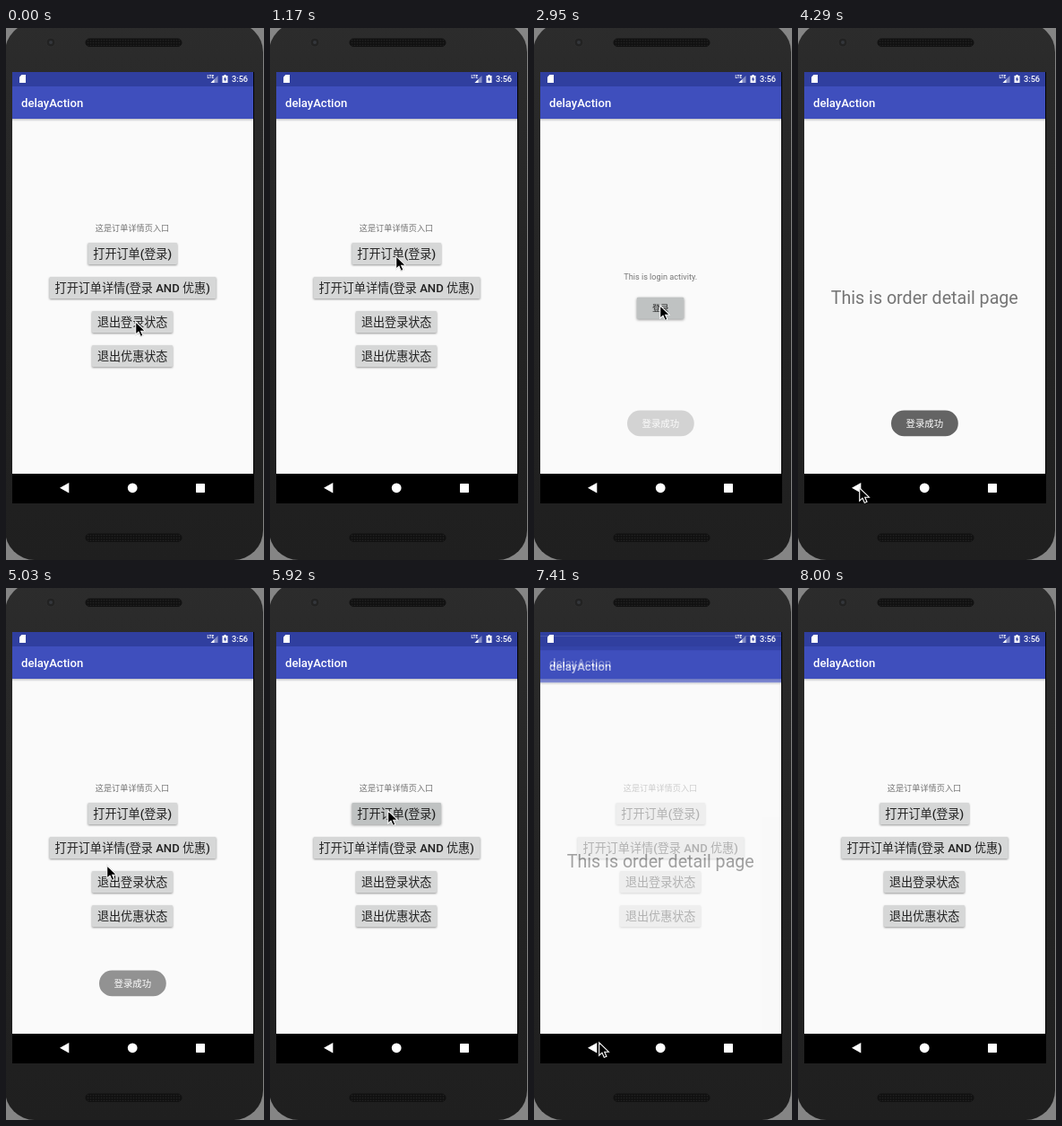
An HTML page that plays this animation: 288 px wide and 592 px high, repeating every 8.15 s.

```html
<!DOCTYPE html>
<html lang="zh">
<head>
<meta charset="utf-8">
<title>delayAction</title>
<style>
  html, body { margin: 0; width: 100%; height: 100%; overflow: hidden; background: #858585; }
  svg { display: block; width: 100%; height: 100%; }
  text { font-family: Roboto, "Noto Sans CJK SC", "Noto Sans CJK", sans-serif; }
  .mid { text-anchor: middle; }
  .small { font-size: 9.17px; fill: #757575; }
  .label { font-size: 13.1px; font-weight: 500; fill: #212121; }
  .button rect { fill: #d6d7d7; filter: drop-shadow(0 1px .8px #0006); }
  .button.pressed rect { fill: #bfc2c2; filter: drop-shadow(0 1.5px 1.5px #0006); }
</style>
</head>
<body>
<svg viewBox="0 0 288 592">
  <defs>
    <linearGradient id="body" x2="0" y2="1">
      <stop offset="0" stop-color="#2c2c2c"/>
      <stop offset=".5" stop-color="#242424"/>
      <stop offset="1" stop-color="#1f1f1f"/>
    </linearGradient>
    <linearGradient id="shade" x2="0" y2="1">
      <stop offset="0" stop-opacity=".22"/>
      <stop offset="1" stop-opacity="0"/>
    </linearGradient>
    <pattern id="mesh" width="3" height="3" patternUnits="userSpaceOnUse">
      <rect width="3" height="3" fill="#111"/>
      <circle cx="1.5" cy="1.5" r=".8" fill="#222"/>
    </pattern>
    <clipPath id="glass"><path d="M7 49H277V529H7Z"/></clipPath>
    <g id="window">
      <path d="M7 49H276V529H7Z" fill="#fafafa"/>
      <path d="M7 101H276V104H7Z" fill="url(#shade)"/>
      <path d="M7 64H276V101H7Z" fill="#3f4fbd"/>
      <path d="M7 49H276V65H7Z" fill="#303f9f"/>
      <text x="17" y="87.7" font-size="13.1" font-weight="500" fill="#fff">delayAction</text>
    </g>
    <rect id="speaker" x="89" y="12" width="107" height="8.5" rx="4.2" fill="url(#mesh)" stroke="#111"/>
  </defs>

  <rect x="-1" y="-6" width="288" height="598" rx="33" fill="url(#body)"/>
  <circle cx="50" cy="16" r="5" fill="#222" stroke="#303030"/>
  <circle cx="50" cy="16" r="2" fill="#34373c"/>
  <use href="#speaker"/>
  <use href="#speaker" y="551"/>

  <g clip-path="url(#glass)">
    <path d="M276 49H277V529H276Z"/>
    <g id="home">
      <use href="#window"/>
      <text class="mid small" x="141" y="226">这是订单详情页入口</text>
    </g>
    <g id="login">
      <use href="#window"/>
      <text class="mid small" x="141.2" y="279.8">This is login activity.</text>
    </g>
    <g id="detail">
      <use href="#window"/>
      <text class="mid" x="141.3" y="306.8" font-size="19.65" fill="#757575">This is order detail page</text>
    </g>

    <g fill="#fff">
      <path d="M17.5 52H22V61H15V54.5Z"/>
      <text x="224.5" y="56.2" font-size="4.8" font-weight="700">LTE</text>
      <path d="M236.5 53V61H228.5Z" fill-opacity=".4"/>
      <path d="M232.5 57V61H228.5Z"/>
      <path d="M243.5 52H245.5V53H247.5V61H241.5V53H243.5Z"/>
      <path d="M245 54L242.8 57.6H244.2V60L246.3 56.4H245Z" fill="#303f9f"/>
      <text x="252" y="60" font-size="9.17" font-weight="500">3:56</text>
    </g>

    <path d="M7 496H277V529H7Z"/>
    <g fill="#fff">
      <path d="M60 511.8L70.3 506V517.6Z"/>
      <circle cx="141.2" cy="511.8" r="5.4"/>
      <rect x="212" y="507" width="10" height="10" rx=".7"/>
    </g>

    <g id="toast">
      <rect x="104" y="425.5" width="74.8" height="28.8" rx="14.4" fill="#646464"/>
      <text class="mid" x="141.3" y="443.7" font-size="10.4" fill="#fff">登录成功</text>
    </g>
  </g>

  <path id="cursor" d="M.7 .8V15.2L4 12.2L6.3 17.4L9 16.3L6.7 11.2H11.4Z" stroke="#fff" stroke-width="1.1" style="filter:drop-shadow(0 .8px .7px #0006)"/>
</svg>
<script>
const LOOP = 8150, TICKS = 55;
const $ = id => document.getElementById(id);

function addButton(parent, text, x, y, width, small) {
  const g = document.createElementNS("http://www.w3.org/2000/svg", "g");
  g.setAttribute("class", "button");
  g.innerHTML = `<rect x="${x}" y="${y}" width="${width}" height="24" rx="1.3"/>
    <text class="mid label" x="141.2" y="${y + (small ? 15.3 : 17)}" ${small ? 'style="font-size:9.17px"' : ""}>${text}</text>`;
  $(parent).append(g);
  return g;
}

const openOrder = addButton("home", "打开订单(登录)", 91.5, 239, 99.5);
addButton("home", "打开订单详情(登录 AND 优惠)", 48.5, 277, 186);
const logout = addButton("home", "退出登录状态", 96, 315, 90);
addButton("home", "退出优惠状态", 96, 353, 90);
const signIn = addButton("login", "登录", 114.8, 299.7, 52.5, true);

// Tracks hold [tick, ...values] and are interpolated linearly.
const cursorTrack = [
  [0, 144, 326], [3, 144, 326], [8, 140, 253], [14, 140, 253], [18, 140, 308], [21, 140, 308],
  [23, 75, 482], [24, 75, 482], [26, 68, 511], [32, 68, 511], [34, 112, 308], [36, 125, 264],
  [37, 125, 264], [38, 131, 247], [41, 131, 247], [44, 177, 417], [47, 72, 505], [50, 72, 505], [54, 100, 610]
];
const loginTrack = [[12, 0], [14, 1], [24, 1], [25, 0]];
const detailTrack = [[20, 0], [22, 1], [30, 1], [33, 0], [40, 0], [42, 1], [49, 1], [52, 0]];
const toastTrack = [[19, 0], [20, .25], [22, 1], [33, 1], [34, .69], [36, 0]];

function sample(track, tick) {
  const next = track.findIndex(key => key[0] > tick);
  if (next <= 0) return (next ? track.at(-1) : track[0]).slice(1);
  const a = track[next - 1], b = track[next];
  const p = (tick - a[0]) / (b[0] - a[0]);
  return a.slice(1).map((v, i) => v + (b[i + 1] - v) * p);
}

function showWindow(id, track, tick) {
  const [p] = sample(track, tick);
  $(id).setAttribute("opacity", p);
  $(id).setAttribute("transform", `translate(0 ${38 * (1 - p) ** 2})`);
}

function press(button, tick, ...spans) {
  button.classList.toggle("pressed", spans.some(([from, to]) => tick >= from && tick < to));
}

function draw(ms) {
  const tick = Math.min(TICKS - 1, Math.floor((ms % LOOP + 16) * TICKS / LOOP));
  showWindow("login", loginTrack, tick);
  showWindow("detail", detailTrack, tick);
  $("toast").setAttribute("opacity", sample(toastTrack, tick)[0]);
  $("cursor").setAttribute("transform", `translate(${sample(cursorTrack, tick)})`);
  press(logout, tick, [2, 4]);
  press(openOrder, tick, [12, 14], [40, 42]);
  press(signIn, tick, [19, 22]);
}

const start = performance.now();
function loop() {
  draw(performance.now() - start);
  requestAnimationFrame(loop);
}
loop();
</script>
</body>
</html>
```
